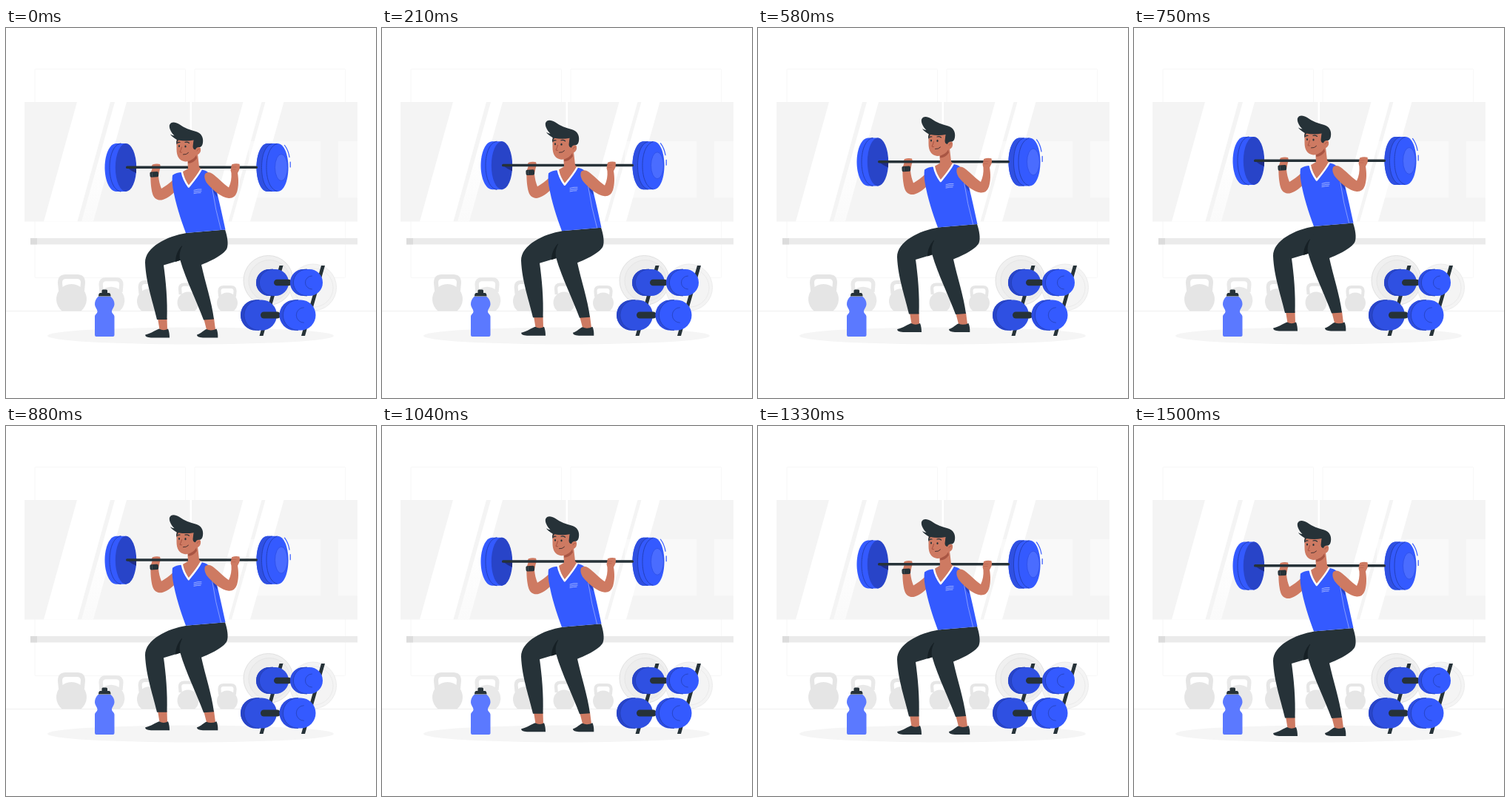
Write an HTML page that moves like this. It is 500 px wide and 500 px high and loops after 1.54 s.

```html
<!DOCTYPE html>
<html lang="en">
<head>
<meta charset="utf-8">
<title>Squat with barbell</title>
<style>
  html, body { margin: 0; width: 100%; height: 100%; overflow: hidden; background: #fff; }
  svg { display: block; width: 100%; height: 100%; }
  .blue { fill: #345aff; }
  .deep { fill: #2f50e2; }
  .shade { fill: #2844c8; }
  .dark { fill: #263238; }
  .skin { fill: #ce7a62; }
  .line { fill: none; stroke-linecap: round; stroke-linejoin: round; }
</style>
</head>
<body>
<svg viewBox="0 0 500 500" xmlns="http://www.w3.org/2000/svg">
  <defs>
    <linearGradient id="fade" x1="0" y1="0" x2="0" y2="1">
      <stop offset=".4" stop-color="#fff"/>
      <stop offset="1" stop-color="#fafafa"/>
    </linearGradient>
  </defs>

  <!-- room -->
  <g fill="none" stroke="#f7f7f7">
    <rect x="39" y="55.5" width="203.500" height="282" rx="1"/>
    <rect x="255" y="55.5" width="203.500" height="282" rx="1"/>
    <path d="M0 382.500H500" stroke="#efefef"/>
  </g>
  <path d="M25 100H248.500V261.500H25ZM251 100H475V261.500H251Z" fill="#f4f4f4"/>
  <path d="M328 153H425V229.500H328ZM449 153H475V229.500H449Z" fill="#f9f9f9"/>
  <path d="M96 100H141L96.500 261.500H51ZM320.500 100H345.500L300.500 261.500H275.500ZM350.500 100H375.500L330 261.500H305Z" fill="#fff"/>
  <path d="M147 100H163L118 261.500H102Z" fill="url(#fade)"/>
  <rect x="33" y="284" width="442" height="8.500" fill="#ebebeb"/>
  <rect x="33" y="284" width="9" height="8.500" fill="#dcdcdc"/>
  <g id="kettles"></g>

  <!-- loose plates -->
  <g stroke="#e1e1e1">
    <circle cx="354.500" cy="341" r="33.500" fill="#f0f0f0"/>
    <circle cx="356" cy="341.500" r="28" fill="#ededed" stroke="#e6e6e6"/>
    <circle cx="415" cy="350.500" r="31.500" fill="#f4f4f4" stroke="#ececec"/>
    <circle cx="416" cy="351" r="26" fill="none" stroke="#ebebeb"/>
  </g>
  <ellipse cx="249.500" cy="416" rx="193.500" ry="11.500" fill="#f5f5f5"/>

  <!-- rack -->
  <path class="dark" d="M369.500 321H374.500L347.500 416H342.500ZM426 321H431L404 416H399Z"/>
  <g id="bells"></g>

  <!-- bottle -->
  <path d="M124.500 363H141.500C145 366 146.500 369 146.500 373C146.500 377.500 143 380 143 383C143 386 146.500 387 146.500 390V415Q146.500 417 144.500 417H122Q120 417 120 415V390C120 387 123.500 386 123.500 383C123.500 380 120 377.500 120 373C120 369 121.500 366 124.500 363Z" fill="#5b79ff"/>
  <path class="dark" d="M129.500 358V355Q129.500 353.500 131 353.500H135.500Q137 353.500 137 355V358H139.500Q141.500 358.500 141.500 362.500H125Q125 358.500 127 358Z"/>

  <g id="lifter">
    <!-- left weights -->
    <path class="blue" d="M149 156H163V221H149C140 221 133.500 206 133.500 188.500S140 156 149 156Z"/>
    <path class="line" d="M155 156C146 157 140 171 140 188.500S146 220 155 221" stroke="#2440b8"/>
    <ellipse class="shade" cx="162" cy="188.500" rx="14.200" ry="32.500"/>
    <path d="M164 189H176V196Q169 193 164 189Z" fill="#1d2c86"/>

    <!-- right weights -->
    <path class="blue" d="M353 156H367C375.500 156 381.500 170.500 381.500 188.500S375.500 221 367 221H353C345 221 338.500 206.500 338.500 188.500S345 156 353 156Z"/>
    <path d="M353 156H360C351 159 345.500 172 345.500 188.500S351 218 360 221H353C345 221 338.500 206.500 338.500 188.500S345 156 353 156Z" class="deep"/>
    <path class="line" d="M359 156.500C350 159 345.500 172 345.500 188.500S350 218 359 220.500M366 156.500C357 159 352 172 352 188.500S357 218 366 220.500" stroke="#2440b8"/>
    <ellipse cx="372" cy="188.500" rx="8.500" ry="18" fill="#4a6cff" stroke="#2d4fe6" stroke-width=".8"/>
    <path class="line" d="M376.500 158.500Q381.500 165 383 174.500M384.200 181V188" stroke="#345aff" stroke-width="1.200"/>

    <!-- left arm -->
    <path class="skin" d="M228 203L226 205C221 210 215 214 210 217C208 212 206.500 206 206 200L207.500 192.500Q209.500 187 208 184Q203 183 198 184.500Q196 187 197.500 190L195.500 196C195 206 196 217 198 224C200 231 206 234 212 232C219 230 226 224 231 218Z"/>
    <rect class="dark" x="162" y="186.600" width="178" height="3.500" rx="1.700"/>
    <rect class="dark" x="194.500" y="194.300" width="11.500" height="7.300" rx="1.800" transform="rotate(-3 200 198)"/>
    <path class="line" d="M197.500 196V200.500" stroke="#4a575d" stroke-width=".7"/>

    <!-- feet -->
    <path class="skin" d="M205 392H217.500L218 408Q212 411 207.500 407.500ZM267 392H281L283 407.500Q276 411 271 407.500Z"/>
    <path class="dark" d="M188.200 414.500C196 413 202 408 207 406.500Q213 410 219 406.500C220.500 410 221 414 221 418.500H196Q187.500 418 188.200 414.500Z"/>
    <path class="dark" d="M258 414.500C264 413 267 408 271 407Q277 410 284.500 406.500C286 410 286.500 414 286.300 418.500H266Q257.500 418 258 414.500Z"/>

    <!-- trousers -->
    <path class="dark" d="M244 277C218 281 188 296 188 317C189 345 200 375 204 394H217.500C218.500 368 216 342 213 320.500L238 313L262 290Z"/>
    <path d="M238 294C232 300 229 308 229 316L238 313Z" fill="#162025"/>
    <path class="dark" d="M243 277L296 272.500C299 281 301 292 298.500 298C294 307 276 315 264 320C269 343 278 370 281 393.500L267 394.500C258 370 243 340 235.500 314C233 305 236 296 243 288Z"/>

    <!-- neck and shirt -->
    <path class="skin" d="M245 173L259 170L261 188L270 196L247 217L236 196L246 190Z"/>
    <path class="blue" d="M225 199Q230 195 238 195L247 216L264 191.500Q270 192 273 195L285 222C289 238 293 256 296.500 272.500L243 277C236 258 229 237 225.500 216Q224 206 225 199Z"/>
    <path class="line" d="M237.800 194.500C239 201 242 208 246.800 214.500C253 207 259 200 263.500 191.500" stroke="#fff" stroke-width="2.500"/>
    <path class="shade" d="M276 212Q281 216 284 220L286 229Q279 222 276 212Z"/>
    <path class="line" d="M278.500 216Q283 246 290.500 272.500" stroke="#8ea3ff" stroke-width=".9"/>
    <path class="line" d="M254 219.300Q259 217.500 264 218M254 221.500Q259 220 264 220.300M254 223.600Q259 222.300 263 222.500" stroke="#a9b9ff" stroke-width=".9"/>

    <!-- right arm -->
    <path class="skin" d="M269 197Q273 193 279 197C286 202 293 210 301 215.500C304 209 305 203 304.500 196L303.500 192L305 184.500Q310 182.500 315.500 183.800Q316.500 187 315.500 191L313 196C314.500 205 314.500 214 312 222Q309 230.500 301 230C291 229 279 219 271 209Q267 202 269 197Z"/>
    <path class="line" d="M305.500 188H311M305 191H310" stroke="#b5624d" stroke-width=".6"/>

    <!-- head -->
    <path d="M246 179Q253 179 257 172L258 176Q253 183 246 183Z" fill="#a85543"/>
    <path class="skin" d="M230.500 149L253 149L256 162Q260 158.500 263 162.500Q264 169 258.500 171.500Q256 172 255 171C254 176 249 181 242 180.500C234 179.500 230.500 173 230.500 164Z"/>
    <path class="dark" d="M231 151C229 149.500 224 147 222 143.500Q225 145.500 227.500 145.500C223 141 220 135 221 131C223 126 229 127 234 130C241 135 249 138 257 140C264 142 267 148 266 155C265.500 159 263.500 161.500 260.500 161Q257 161 256 164.500Q252.500 164 252.500 160L253.500 151.500C246 153 239 152.500 233 151.500Q231 154 230.500 158Q229.300 154 231 151Z"/>
    <ellipse class="dark" cx="234" cy="159.500" rx="1" ry="1.500"/>
    <ellipse class="dark" cx="242.500" cy="160" rx="1.100" ry="1.600"/>
    <path class="line" d="M231.500 155.500Q233 154 235 154.500M242 154.500Q245 153.500 247.500 155.500" stroke="#263238" stroke-width="1.200"/>
    <path class="line" d="M237.500 161Q236.500 165 235 167.500Q236 168.800 237.500 168" stroke="#a04a3c" stroke-width=".9"/>
    <path class="line" d="M239.500 171Q244 171.500 246.500 168.500" stroke="#3a2a2c" stroke-width=".9"/>
    <path class="line" d="M258 166Q259 163.500 261 163.500" stroke="#a85543" stroke-width=".8"/>
  </g>
</svg>
<script>
const $ = id => document.getElementById(id);

// Kettlebell: centre x, body half width, top of handle, fill
function kettle(x, r, top, fill) {
  const k = r / 20.5, w = 15.5 * k, y = top + 3 * k;
  const flat = r * 0.62, mid = 382.5 - r * 0.79;
  return `<path d="M${x - w + k} ${y + 19 * k}L${x - w} ${y + 8 * k}Q${x - w} ${y} ${x - w + 8 * k} ${y}H${x + w - 8 * k}Q${x + w} ${y} ${x + w} ${y + 8 * k}L${x + w - k} ${y + 19 * k}" fill="none" stroke="${fill}" stroke-width="${6 * k}"/>
    <path d="M${x - flat} 382.500A${r} ${r} 0 1 1 ${x + flat} 382.500Z" fill="${fill}"/>`;
}
$('kettles').innerHTML = [
  [88.5, 20.5, 333, '#e5e5e5'], [142, 18.3, 337, '#e9e9e9'],
  [194, 17, 341, '#e6e6e6'], [246, 14.5, 344.5, '#e6e6e6'], [299, 14, 348, '#e6e6e6']
].map(a => kettle(...a)).join('');

// One dumbbell head, rounded at both ends; crescents mark the edges of its plates
function head(x, y, w, h, cls, front) {
  const a = w * 0.41, r = h / 2, m = y + r;
  const arc = (dx, s) => {
    const cx = x + dx + a, q = r * s;
    return `M${cx} ${m - q}A${a * s} ${q} 0 0 0 ${cx} ${m + q}`;
  };
  return `<rect class="${cls}" x="${x}" y="${y}" width="${w}" height="${h}" rx="${a}" ry="${r}"/>
    <path class="shade" d="${arc(0, 1)}H${x + a + w * 0.1}A${a} ${r} 0 0 1 ${x + a + w * 0.1} ${y}Z" ${front ? 'opacity=".55"' : ''}/>
    <path class="line" d="${arc(w * 0.1, 1)}" stroke="#2440b8" stroke-width=".9"/>
    ${front ? `<path class="line" d="${arc(w * 0.26, 0.5)}" stroke="#2440b8" stroke-width=".8"/>` : ''}`;
}
function dumbbell(x, y, w, h, gap, bar, barW, barH) {
  return head(x, y, w, h, 'deep', false) +
    `<rect class="dark" x="${bar}" y="${y + h / 2 - barH / 2}" width="${barW}" height="${barH}" rx="${barH / 2}"/>` +
    head(x + gap, y, w, h, 'blue', true);
}
$('bells').innerHTML =
  dumbbell(338, 326, 44, 36, 46, 362, 24, 8.5) +
  dumbbell(317, 367.5, 49, 41, 52.5, 344, 27, 9);

// Steady rise and fall by ten units
const LOOP = 1540, LEAD = 48, RISE = 10;
const lifter = $('lifter');
let start;
function lift(t) {
  const p = ((t + LEAD) % LOOP) / LOOP;
  return 0.62 - RISE * (1 - Math.abs(2 * p - 1));
}
function draw(now) {
  if (start === undefined) start = now;
  lifter.setAttribute('transform', `translate(0 ${lift(now - start).toFixed(3)})`);
  requestAnimationFrame(draw);
}
requestAnimationFrame(draw);
</script>
</body>
</html>
```
